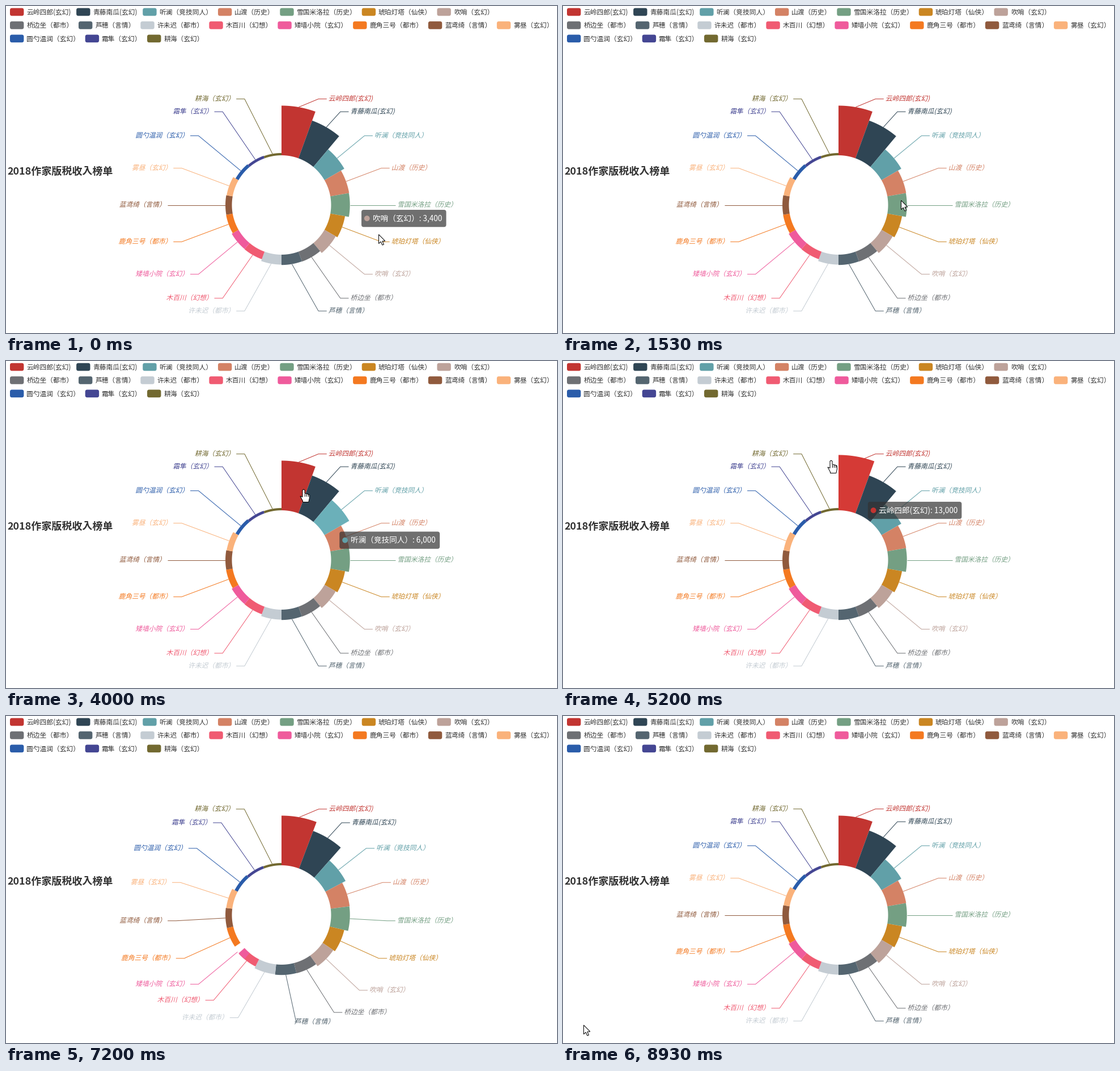
These frames come from a looping animation (972 px wide and 576 px high, 9.14 s). A matplotlib script:

```python
import numpy as np
import matplotlib.pyplot as plt
from matplotlib.animation import FuncAnimation
from matplotlib.collections import LineCollection, PathCollection
from matplotlib.patches import Circle, FancyBboxPatch, Polygon
from matplotlib.path import Path
from matplotlib.textpath import TextPath
from matplotlib.transforms import Affine2D, IdentityTransform

W, H, DPI = 972, 576, 72
LOOP, STEP = 9140, 20
TICKS_PER_MS = 0.015
FONT = "Noto Sans CJK JP"
plt.rcParams["font.family"] = FONT

S = 0.976  # page zoom
CX, CY, R_IN, R_OUT = 486, 350.5, 87.5, 175
LEAD = 15 * S
SMALL, MEDIUM = 12 * S, 14 * S

ITEMS = [
    ("云岭四郎(玄幻)", 13000, "#c23531"),
    ("青藤南瓜(玄幻)", 10500, "#2f4554"),
    ("听澜（竞技同人）", 6000, "#61a0a8"),
    ("山渡（历史）", 5000, "#d48265"),
    ("雪国米洛拉（历史）", 4930, "#749f83"),
    ("琥珀灯塔（仙侠）", 3900, "#ca8622"),
    ("吹哨（玄幻）", 3400, "#bda29a"),
    ("桥边坐（都市）", 2750, "#6e7074"),
    ("芦穗（言情）", 2700, "#546570"),
    ("许未迟（都市）", 2600, "#c4ccd3"),
    ("木百川（幻想）", 2100, "#f05b72"),
    ("矮墙小院（玄幻）", 2050, "#ef5b9c"),
    ("鹿角三号（都市）", 1750, "#f47920"),
    ("蓝鸢绮（言情）", 1700, "#905a3d"),
    ("雾昼（玄幻）", 1600, "#fab27b"),
    ("圆勺温润（玄幻）", 900, "#2a5caa"),
    ("霜隼（玄幻）", 700, "#444693"),
    ("耕海（玄幻）", 600, "#726930"),
]
NAMES, VALUES, COLORS = zip(*ITEMS)
N = len(ITEMS)
RADII = [R_IN + v / max(VALUES) * (R_OUT - R_IN) for v in VALUES]
TOGGLED = 11
T_OFF, T_ON, T_MORPH = 6320, 7151, 300

# pointer path: (time, x, y); the chart answers LAG ms later
MOUSE = np.array([
    (0, 657, 402), (250, 712, 440), (500, 575, 425), (680, 440, 415),
    (800, 494, 412), (930, 540, 408), (1400, 596, 342), (1830, 596, 342),
    (2130, 553, 291), (2840, 553, 291), (2900, 572, 278), (3050, 572, 278),
    (3500, 541, 241), (3990, 526, 226), (4100, 516, 228), (4250, 516, 228),
    (4600, 486, 189), (5190, 472, 178), (5530, 505, 92), (6100, 524, 27),
    (7860, 512, 38), (8730, 103, 536), (8860, 36, 544),
]).T
LAG = 1000
MOUSE_GONE = (6110, 7860)

ARROW = np.array([(0, 0), (0, 16), (3.7, 12.6), (6.4, 18.6), (9, 17.5),
                  (6.4, 11.7), (11.3, 11.4)]) + 0.5
HAND = np.array([(-2, 1.5), (0, 0), (2, 1.5), (2, 7), (7.6, 8.4), (10.4, 10),
                 (10.4, 15.5), (8.8, 22.5), (-1.5, 22.5), (-1.5, 20.5),
                 (-6, 12), (-2, 13.5)])
KNUCKLES = np.array([(x, y) for x in (2, 4.8, 7.6) for y in (7.5, 11.5, np.nan)])


def cubic_out(u):
    return 1 - (1 - min(max(u, 0), 1)) ** 3


def elastic_out(u):
    if u <= 0 or u >= 1:
        return float(u >= 1)
    return 2 ** (-10 * u) * np.sin((u - 0.1) * 2 * np.pi / 0.4) + 1


def lift(color):
    rgb = [int(color[k:k + 2], 16) for k in (1, 3, 5)]
    return tuple(min(1, c * 1.1 / 255) for c in rgb)


def text_width(text, size):
    def em(c):
        return 0.565 if c.isdigit() else 0.3 if c.isascii() else 1
    return size * sum(em(c) for c in text)


def rounded(x, y, w, h, radius, **style):
    shape = f"round,pad=0,rounding_size={radius}"
    return ax.add_patch(FancyBboxPatch((x, y), w, h, boxstyle=shape, lw=0, **style))


def mouse_at(t):
    return np.array([np.interp(t, MOUSE[0], MOUSE[k]) for k in (1, 2)])


def slice_under(pos):
    dx, dy = pos - (CX, CY)
    i = int(np.degrees(np.arctan2(dx, -dy)) % 360 // (360 / N))
    return i if R_IN <= np.hypot(dx, dy) <= RADII[i] else None


def simulate():
    """Hovered slice, last hover changes and tooltip for every screen tick."""
    states = []
    lit, changed = None, np.full(N, -1e6)
    tip_item, tip_pos, last_hit = 6, np.array([627.0, 359.0]), 0
    for k in range(int(LOOP * TICKS_PER_MS) + 1):
        t = k / TICKS_PER_MS
        pos = mouse_at(t - LAG)
        hit = slice_under(pos)
        if hit != lit:
            for i in (hit, lit):
                if i is not None:
                    changed[i] = t
            lit = hit
        if hit is not None:
            tip_item, last_hit = hit, t
            tip_pos = tip_pos + (pos + 20 - tip_pos) * 0.5
        shown = t - last_hit < 150
        states.append((lit, changed.copy(), tip_item if shown else None, tip_pos))
    return states


def sector(a0, a1, r):
    a = np.radians(np.linspace(a0, a1, 24))
    arc = np.c_[np.sin(a), -np.cos(a)]
    pts = np.r_[arc * r, arc[::-1] * R_IN] + (CX, CY)
    return Path(np.r_[pts, pts[:1]], closed=True)


def place_label(slot, count, r):
    """Leader line, text anchor and side of one slice among count slices."""
    mid = np.radians((slot + 0.5) * 360 / count)
    nx, ny = np.sin(mid), -np.cos(mid)
    side = 1 if nx > 1e-9 else -1
    reach = R_OUT + LEAD
    dy = ny * reach
    if abs(dy) < reach - 1e-6:
        dx = np.sqrt((reach + LEAD) ** 2 - dy ** 2)
    else:
        dx = abs(nx) * reach + LEAD + 5
    x, y = CX + side * dx, CY + dy
    end = x - 3 * side
    line = np.array([(CX + nx * r, CY + ny * r), (end - LEAD * side, y), (end, y)])
    return line, np.array([x, y]), side


STATES = simulate()
FULL = [place_label(i, N, RADII[i]) for i in range(N)]
PART = [place_label(i - (i > TOGGLED), N - 1, RADII[i]) for i in range(N)]

fig = plt.figure(figsize=(W / DPI, H / DPI), dpi=DPI, facecolor="white")
ax = fig.add_axes([0, 0, 1, 1])
ax.set_xlim(0, W)
ax.set_ylim(H, 0)
ax.axis("off")

ax.text(2.5, 297, "2018作家版税收入榜单", size=18, weight="bold", color="#333")

legend = []
x, y = 7, 10.5
for name, color in zip(NAMES, COLORS):
    width = sum(4 if c.isascii() else 12 for c in name)
    if x + (width + 30) * S > W - 5:
        x, y = 7, y + 24 * S
    box = rounded(x, y - 7 * S, 25 * S, 14 * S, 3.5, fc=color)
    label = ax.text(x + 30 * S, y + 4, name, size=SMALL, color="#333")
    legend.append((box, label))
    x += (width + 40) * S

slant = Affine2D().skew(np.arctan(0.25), 0)
glyphs = [slant.transform_path(TextPath((0, 0), n, size=SMALL, prop={"family": FONT}))
          for n in NAMES]

leaders = LineCollection([], linewidths=1, zorder=2)
slices = PathCollection([], linewidths=0, zorder=3)
labels = PathCollection([], linewidths=0, zorder=4, offsets=np.zeros((1, 2)),
                        transform=IdentityTransform(),
                        offset_transform=ax.transData)
for c in (leaders, slices, labels):
    ax.add_collection(c, autolim=False)

TIP_H = 31 * S
tip_box = rounded(0, 0, 10, TIP_H, 4, fc=(0.196, 0.196, 0.196, 0.7), zorder=6)
tip_dot = ax.add_patch(Circle((0, 0), 5 * S, lw=0, zorder=7))
tip_text = ax.text(0, 0, "", size=MEDIUM, color="white", zorder=7)

cursor = ax.add_patch(Polygon(ARROW, fc="white", ec="black", lw=1, zorder=9))
knuckles, = ax.plot([], [], color="black", lw=1, zorder=10)


def draw_chart(t, lit, changed):
    removed = T_OFF <= t < T_ON
    back = cubic_out((t - T_ON) / T_MORPH)
    part = cubic_out((t - T_OFF) / T_MORPH) if t < T_ON else 1 - back
    shown = [i for i in range(N) if not (removed and i == TOGGLED)]
    paths, fills, lines, spots = [], [], [], []
    for i in shown:
        a0, a1 = 360 / N * i, 360 / N * (i + 1)
        line, pos, side = FULL[i]
        if i == TOGGLED:
            if t >= T_ON:
                a1 = a0 + (a1 - a0) * back
        else:
            slot, wide = i - (i > TOGGLED), 360 / (N - 1)
            a0 += (slot * wide - a0) * part
            a1 += ((slot + 1) * wide - a1) * part
            line = line + (PART[i][0] - line) * part
            pos = pos + (PART[i][1] - pos) * part
            side = PART[i][2] if removed else side
        grow = elastic_out((t - changed[i]) / 300)
        extra = 10 * (grow if i == lit else 1 - grow)
        paths.append(sector(a0, a1, RADII[i] + extra))
        fills.append(lift(COLORS[i]) if i == lit else COLORS[i])
        lines.append(line)
        shift = 0 if side > 0 else -SMALL * len(NAMES[i])
        spots.append((pos[0] + shift, pos[1] + 3.2))
    colors = [COLORS[i] for i in shown]
    slices.set_paths(paths)
    slices.set_facecolor(fills)
    leaders.set_segments(lines)
    leaders.set_color(colors)
    labels.set_paths([glyphs[i] for i in shown])
    labels.set_offsets(spots)
    labels.set_facecolor(colors)

    box, label = legend[TOGGLED]
    box.set_facecolor("#ccc" if removed else COLORS[TOGGLED])
    label.set_color("#ccc" if removed else "#333")


def draw_tip(i, pos):
    for part in (tip_box, tip_dot, tip_text):
        part.set_visible(i is not None)
    if i is None:
        return
    x, y = pos
    text = f"{NAMES[i]}: {VALUES[i]:,}"
    tip_box.set_bounds(x, y, text_width(text, MEDIUM) + 25 * S, TIP_H)
    tip_dot.center = (x + 10 * S, y + TIP_H / 2)
    tip_dot.set_facecolor(COLORS[i])
    tip_text.set_position((x + 20 * S, y + TIP_H / 2 + 5))
    tip_text.set_text(text)


def draw_cursor(t, lit):
    pos = mouse_at(t).round()
    seen = not MOUSE_GONE[0] <= t < MOUSE_GONE[1]
    hand = lit is not None or pos[1] < 45
    cursor.set_xy((HAND if hand else ARROW) + pos)
    cursor.set_visible(seen)
    knuckles.set_data(*(KNUCKLES + pos).T)
    knuckles.set_visible(seen and hand)


def update(frame):
    # the screen refreshes 15 times a second
    tick = int((frame * STEP + 8) * TICKS_PER_MS)
    t = tick / TICKS_PER_MS
    lit, changed, tip_item, tip_pos = STATES[tick]
    draw_chart(t, lit, changed)
    draw_tip(tip_item, tip_pos)
    draw_cursor(t, lit)
    return ()


anim = FuncAnimation(fig, update, frames=LOOP // STEP, interval=STEP,
                     repeat=True, repeat_delay=0, cache_frame_data=False)
plt.show()
```
